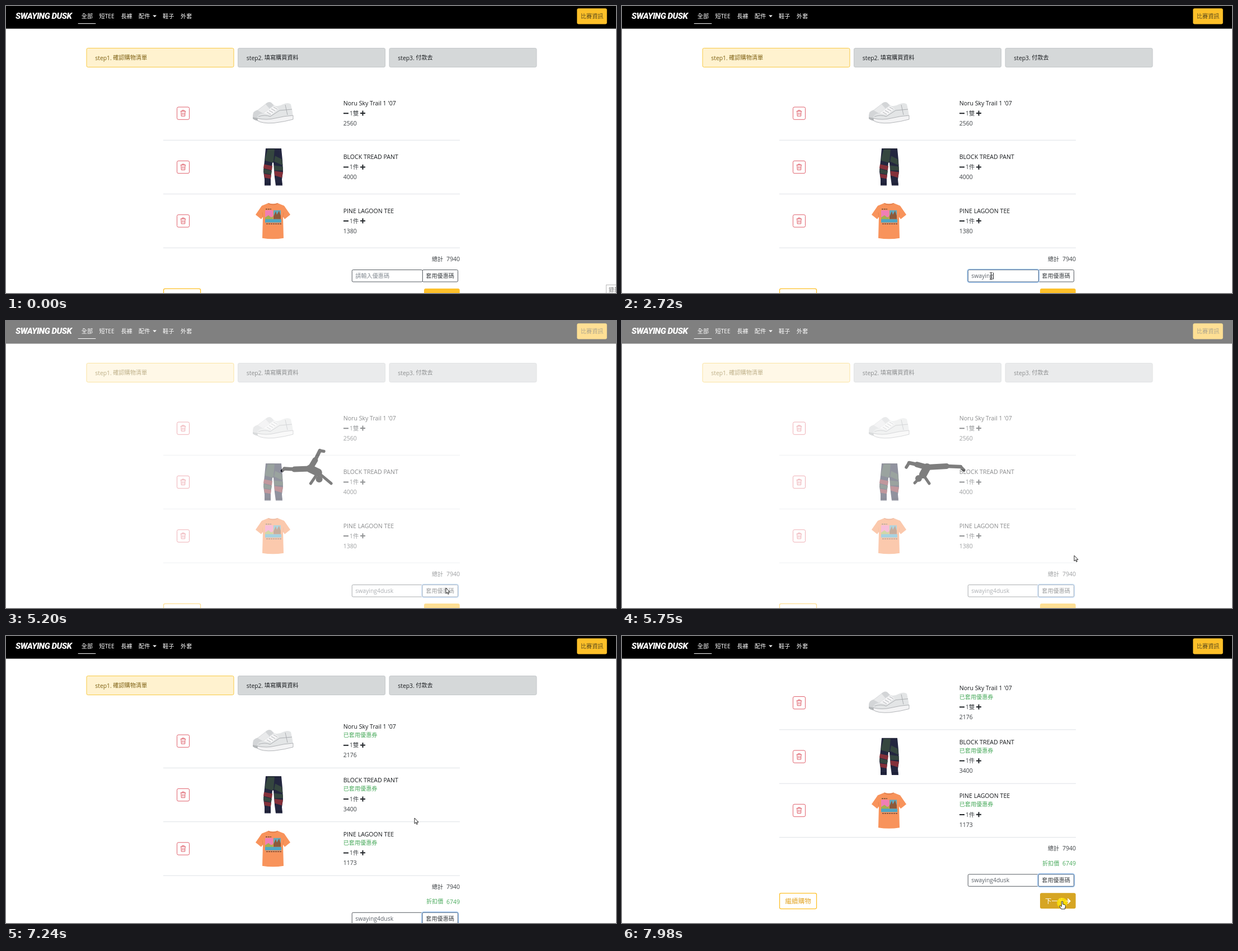
Animation, 1090 px wide and 514 px high, one loop 8000 ms. Source, as an HTML page:

```html
<!DOCTYPE html>
<html lang="zh-Hant">
<head>
<meta charset="utf-8">
<title>Cart</title>
<style>
html, body { margin: 0; width: 100%; height: 100%; overflow: hidden; background: #fff; }
svg { display: block; width: 1090px; height: 514px; }
text { font-family: "Open Sans", "Noto Sans CJK TC", "Noto Sans CJK JP", "Noto Sans CJK", sans-serif; white-space: pre; }
.logo { font: italic 800 15.2px Roboto, sans-serif; letter-spacing: -0.5px; }
</style>
</head>
<body>
<svg id="stage" viewBox="0 0 1090 514"></svg>
<script>
const LOOP = 8000;
const NS = 'http://www.w3.org/2000/svg';
const stage = document.getElementById('stage');

function add(parent, tag, attrs = {}, content) {
  const el = document.createElementNS(NS, tag);
  for (const k in attrs) el.setAttribute(k, attrs[k]);
  if (content !== undefined) el.textContent = content;
  parent.appendChild(el);
  return el;
}
const group = (parent, x = 0, y = 0) => add(parent, 'g', { transform: `translate(${x} ${y})` });
const box = (p, x, y, w, h, fill, more) => add(p, 'rect', { x, y, width: w, height: h, fill, ...more });
const path = (p, d, fill, more) => add(p, 'path', { d, fill, ...more });
const line = (p, d, stroke, width = 1, more) => path(p, d, 'none', { stroke, 'stroke-width': width, ...more });
// y is the middle of the line of text
const text = (p, x, y, s, size, fill, more) => add(p, 'text', { x, y: y + size * 0.37, 'font-size': size, fill, ...more }, s);
const show = (el, on) => el.setAttribute('display', on ? 'inline' : 'none');
const move = (el, x, y) => el.setAttribute('transform', `translate(${x} ${y})`);

const INK = '#3c4044', GREEN = '#4bab5e', AMBER = '#fdc029';

/* ---------- page ---------- */
box(stage, 0, 0, 1090, 514, '#fff');
const page = group(stage);

[
  [144, 'step1.', '確認購物清單', '#fff2cf', '#f8c945', '#7d6012'],
  [414.5, 'step2.', '填寫購買資料', '#d5d8d9', '#c4c8ca', '#1b1e21'],
  [685, 'step3.', '付款去', '#d5d8d9', '#c4c8ca', '#1b1e21']
].forEach(([x, step, label, fill, stroke, ink]) => {
  box(page, x, 75.5, 263, 34, fill, { rx: 2.5, stroke });
  text(page, x + 15.3, 92.7, step, 10.4, ink, { 'font-weight': 500 });
  text(page, x + 47.3, 92.7, label, 10.15, ink, { 'font-weight': 500 });
});

function shoes(g) {
  path(g, 'M-36 4Q-36-4-27-6L-14-16Q-8-22-3-19L6-10 0 10-20 14Q-34 14-36 9Z', '#d3d5d7');
  path(g, 'M-36 7Q-22 11-8 8L-4 13Q-26 17-36 10Z', '#b4b7b9');
  path(g, 'M-27-5L-13-16-6-8-18 0Z', '#e9eaeb');
  path(g, 'M-28 8Q-27 1-17 0L1-14Q9-11 18-16 27-20 32-16L35-2 36 9Q22 15 2 17-18 19-28 13Z', '#e3e5e6');
  path(g, 'M-28 9Q-12 13 4 9 20 5 36 4L36 11Q22 15 2 17.5-20 19-28 13Z', '#f3f3f4', { stroke: '#96999c', 'stroke-width': 0.7 });
  path(g, 'M-17 0L2-13 10-8-3 3Z', '#f5f5f6');
  line(g, 'M-11-2L-4 2M-7-5L0-1M-3-8L4-4M1-11L8-7M22-15L26 3M-26 6Q-14 2-5 6L12-5 34-7', '#9da0a4', 0.8);
}
function pants(g) {
  path(g, 'M-13-33H15L17-12 18 8 16 22 17 33H5L3 18 1-8-1-8-4 20-4 33H-15L-15 22-17 8-15-12Z', '#23263f');
  path(g, 'M-9-33H3L1-10-1-8-15-12Z', '#35463f');
  path(g, 'M4-20L16-14 17.5-3 2-10Z', '#35463f');
  path(g, 'M-16-5L-1-2-2 6-17 2Z', '#84303a');
  path(g, 'M2-3L17.6-1 18 6 2.5 6Z', '#35463f');
  path(g, 'M-17 3L-2 7-3 13-16 11Z', '#35463f');
  path(g, 'M-16 12L-3 14-4 21-15 19Z', '#84303a');
  path(g, 'M2.5 7L18 9 16 19 3 15Z', '#84303a');
  line(g, 'M-13-32.5H15M-15 29.5H-4M5 29.5H16.5', '#171a2d', 1.4);
}
function tee(g) {
  path(g, 'M-10-31Q0-27 10-31L20-27 31-11 21-3 18-7 19 31Q0 34-19 31L-18-7-21-3-31-11-20-27Z', '#f8935b');
  path(g, 'M-10-31Q0-25 10-31L8-32Q0-29-8-32Z', '#e5824f');
  line(g, 'M-18-7L-19-15M18-7L19-15', '#e5824f', 0.8);
  box(g, -14, -19, 14, 15, '#f07fb5');
  box(g, 1, -19, 13, 15, '#63a9bd');
  path(g, 'M-14-6L-8-10-3-6 0-8V-2H-14Z', '#a5b04e');
  path(g, 'M1-8L5-17 7-11 11-18 14-9V-3H1Z', '#8d5a3b');
  box(g, -14, -3, 29, 6, '#4fa6c4');
  line(g, 'M-13-21H-3M-12 5.5H15', '#6b4a3c', 1.4, { 'stroke-dasharray': '3 1' });
}

const before = [], after = [];
[
  ["Noru Sky Trail 1 '07", '1雙', 2560, 2176, shoes],
  ['BLOCK TREAD PANT', '1件', 4000, 3400, pants],
  ['PINE LAGOON TEE', '1件', 1380, 1173, tee]
].forEach(([name, count, price, sale, art], i) => {
  const row = group(page, 0, 192 + i * 96.4);
  box(row, 305.6, -11, 22, 22.3, '#fff', { rx: 2.5, stroke: '#e0606c' });
  line(row, 'M311.7-3.6H321.3M314.6-3.8V-5.2H318.4V-3.8M312.8-3.4L313.3 5.2H319.7L320.2-3.4M315.2-1.2V3.2M317.9-1.2V3.2', '#da4a56', 0.9);
  art(group(row, 477, 0));
  box(row, 281, 47.8, 530, 1, '#dee2e6');

  const info = (list, nameY, qtyY, cost) => {
    const g = group(row);
    text(g, 602.7, nameY, name, 10.6, '#16191c', { 'font-weight': 500 });
    line(g, `M603 ${qtyY + 0.2}h9M633 ${qtyY}h9M637.5 ${qtyY - 4.5}v9`, '#212529', 2);
    text(g, 614, qtyY, count, 10.3, INK);
    text(g, 602.7, qtyY + 18, cost, 10.5, INK);
    list.push(g);
    return g;
  };
  info(before, -18, 0, price);
  text(info(after, -26, 7.5, sale), 602.7, -10.7, '已套用優惠券', 10.15, GREEN);
});

text(page, 761, 453, '總計', 10.15, INK);
text(page, 811, 453, '7940', 10.5, INK, { 'text-anchor': 'end' });
const discount = group(page);
text(discount, 751, 479.7, '折扣價', 10.15, GREEN);
text(discount, 811, 479.7, '6749', 10.5, GREEN, { 'text-anchor': 'end' });
after.push(discount);

/* ---------- coupon field and lower buttons ---------- */
const foot = group(page);
const GLOW = { rx: 3, stroke: '#b5d6fb', 'stroke-width': 3 };
const EDGE_GREY = { rx: 2, stroke: '#565c62' }, EDGE_BLUE = { rx: 2, stroke: '#3f5c7c' };
box(foot, 744, 472.5, 63.5, 21.5, '#fff', EDGE_GREY);
box(foot, 618.3, 472.5, 126, 21.5, '#fff', EDGE_GREY);
const fieldRing = group(foot);
box(fieldRing, 617.8, 472, 127, 22.5, 'none', GLOW);
box(fieldRing, 618.3, 472.5, 126, 21.5, '#fff', EDGE_BLUE);
const applyRing = group(foot);
box(applyRing, 743.5, 472, 64.5, 22.5, 'none', GLOW);
box(applyRing, 744, 472.5, 63.5, 21.5, '#fff', EDGE_BLUE);
text(foot, 750.3, 483.3, '套用優惠碼', 10.15, INK);
const hint = text(foot, 624.3, 483.3, '請輸入優惠碼', 10.15, '#868d94');
const typed = text(foot, 624.3, 483.3, '', 10.4, '#5b6168');
const caret = box(foot, 0, 477.5, 1, 12, '#222');

box(foot, 281.6, 506.3, 66, 28, '#fff', { rx: 2.5, stroke: AMBER, 'stroke-width': 1.3 });
text(foot, 291.5, 520.5, '繼續購物', 11.6, '#e3a72a');
const next = box(foot, 747, 506, 63.7, 28, AMBER, { rx: 3 });
text(foot, 756, 520.5, '下一步', 11.4, '#fff');
line(foot, 'M791.5 520.5H800M796.3 516.2L800.6 520.5 796.3 524.8', '#fff', 1.9);

const tip = group(stage);
box(tip, 1072.5, 499.5, 30, 30, '#fff', { stroke: '#b9b9b9' });
text(tip, 1077, 508.5, '錄影', 10, '#777');

/* ---------- navigation ---------- */
box(stage, 0, 0, 1090, 40.6, '#000');
text(stage, 17, 17, 'SWAYING DUSK', 15.2, '#fff', { class: 'logo' });
[[134.8, '全部'], [166.5, '短TEE'], [205.4, '長褲'], [237, '配件'], [280, '鞋子'], [312, '外套']]
  .forEach(([x, s]) => text(stage, x, 18, s, 10.2, '#fff'));
path(stage, 'M262.3 16.6H269L265.6 20Z', '#fff');
box(stage, 128.7, 31, 31.6, 1, '#fff');
box(stage, 1020.3, 4.2, 53.5, 28.4, AMBER, { rx: 3 });
text(stage, 1027, 18.5, '比賽資訊', 10.15, '#5a4a1c');

/* ---------- loading veil with dancer ---------- */
const veil = add(stage, 'g', { opacity: 0.5 });
box(veil, 0, 0, 1090, 514, '#fff');
// points: hip, chest, head, two hands, then knee, ankle and toe of each leg
const POSES = [
  [543,265, 560,271, 563,283, 547,291, 585,291, 512,270, 488,273, 481,279, 555,250, 569,231, 580,233],
  [544,262, 549,273, 546,284, 534,291, 566,291, 528,248, 536,230, 544,225, 542,246, 528,237, 520,235],
  [545,262, 538,275, 530,282, 523,290, 549,291, 580,260, 605,261, 611,267, 527,257, 513,254, 508,262],
  [546,262, 552,273, 549,284, 538,291, 567,291, 564,266, 550,278, 542,281, 530,250, 538,233, 546,228]
];
const LIMBS = [
  [[0, 1], 14], [[1, 3], 5], [[1, 4], 5], [[0, 5], 10], [[5, 6], 6.5], [[6, 7], 5.5], [[0, 8], 10], [[8, 9], 6.5], [[9, 10], 5.5]
].map(([ends, width]) => ({ ends, el: line(veil, '', '#000', width, { 'stroke-linecap': 'round' }) }));
const head = add(veil, 'circle', { r: 6 });

function dance(t) {
  const beat = ((t - 5080 + 1340) % 1340) / 335;
  const i = Math.floor(beat), f = beat - i;
  const a = POSES[i], b = POSES[(i + 1) % 4];
  const p = a.map((v, k) => v + (b[k] - v) * f);
  for (const { ends: [m, n], el } of LIMBS)
    el.setAttribute('d', `M${p[2 * m]} ${p[2 * m + 1]}L${p[2 * n]} ${p[2 * n + 1]}`);
  head.setAttribute('cx', p[4]);
  head.setAttribute('cy', p[5]);
}

/* ---------- pointer ---------- */
const pointer = group(stage);
const press = add(pointer, 'circle', { cx: 0, cy: 2.5, r: 9.3, fill: '#ffe500', opacity: 0.8 });
const EDGE = { stroke: '#111', 'stroke-width': 0.9, 'stroke-linejoin': 'round' };
const shapes = {
  arrow: path(pointer, 'M0 0V10L2.3 7.9 3.9 11.4 5.4 10.7 3.9 7.3H7Z', '#fff', EDGE),
  hand: path(pointer, 'M-1.2 0.2Q0-1 1.2 0.2V5L5 6Q6.2 6.5 6 8L5 13.5H-1.5L-5 8.5Q-4.5 7-3 7.8L-1.2 9Z', '#fff', EDGE),
  beam: line(pointer, 'M-2.2-6H-.5L0-5.5.5-6H2.2M0-5.5V5.5M-2.2 6H-.5L0 5.5.5 6H2.2', '#222', 1)
};

// progress in n equal jumps, the first at a and the last at b
function jumps(t, a, b, n) {
  if (t < a) return 0;
  return Math.min(1, (Math.floor((t - a) / (b - a) * (n - 1) + 1e-6) + 1) / n);
}
const smooth = p => p * p * (3 - 2 * p);
const mix = (a, b, p) => a + (b - a) * p;

// [start, end, jumps, x, y]
const MOVES = [
  [4330, 4540, 4, 813, 480],
  [4730, 4930, 4, 786, 478],
  [5270, 5750, 8, 808, 420],
  [5820, 6420, 10, 730, 326],
  [7640, 7910, 5, 786.5, 475.5]
];
function place(t) {
  if (t < 4330) {
    const p = jumps(t, 70, 850, 13), q = 1 - p;
    const bend = (a, c, b) => q * q * a + 2 * p * q * c + p * p * b;
    return [bend(1100, 920, 659.5), bend(512, 80, 483.5)];
  }
  let x = 659.5, y = 483.5;
  for (const [a, b, n, tx, ty] of MOVES) {
    const p = smooth(jumps(t, a, b, n));
    x = mix(x, tx, p);
    y = mix(y, ty, p);
  }
  return [x, y];
}

const CODE = 'swaying4dusk';
const KEYS = [1580, 1980, 2110, 2380, 2520, 2580, 2720, 3190, 3450, 3580, 3720, 3850];
const within = (v, a, b) => v >= a && v < b;

function draw(t) {
  const loading = within(t, 5200, 6490), applied = t >= 6760;
  const scroll = 72.5 * smooth(jumps(t, 7240, 7642, 7));
  const drop = applied ? 26.8 : 0;
  move(page, 0, -scroll);
  move(foot, 0, drop);
  before.forEach(g => show(g, !applied));
  after.forEach(g => show(g, applied));

  const word = CODE.slice(0, KEYS.filter(k => t >= k).length);
  typed.textContent = word;
  show(hint, !word);
  show(caret, within(t, 1120, 4330));
  caret.setAttribute('x', 624.3 + (word ? typed.getComputedTextLength() : 0));
  show(fieldRing, within(t, 1120, 5070));
  show(applyRing, t >= 5070);
  show(tip, t < 70);

  show(veil, loading);
  if (loading) dance(5750 + Math.floor((t - 5750) / 67) * 67);

  const [x, y] = place(t);
  const py = y + scroll - drop;
  const onField = within(x, 618, 744) && within(py, 472, 495);
  const onApply = within(x, 744, 808) && within(py, 472, 495);
  const onNext = within(x, 747, 811) && within(py, 506, 534);
  const kind = loading ? 'arrow' : onField ? 'beam' : onApply || onNext ? 'hand' : 'arrow';
  for (const k in shapes) show(shapes[k], k === kind);
  next.setAttribute('fill', onNext ? '#d6a523' : AMBER);
  show(press, within(t, 1120, 1250) || within(t, 5070, 5200) || t >= 7970);
  show(pointer, t >= 70);
  move(pointer, x, y);
}

const began = performance.now();
function tick() {
  draw((performance.now() - began) % LOOP);
  requestAnimationFrame(tick);
}
tick();
</script>
</body>
</html>
```
